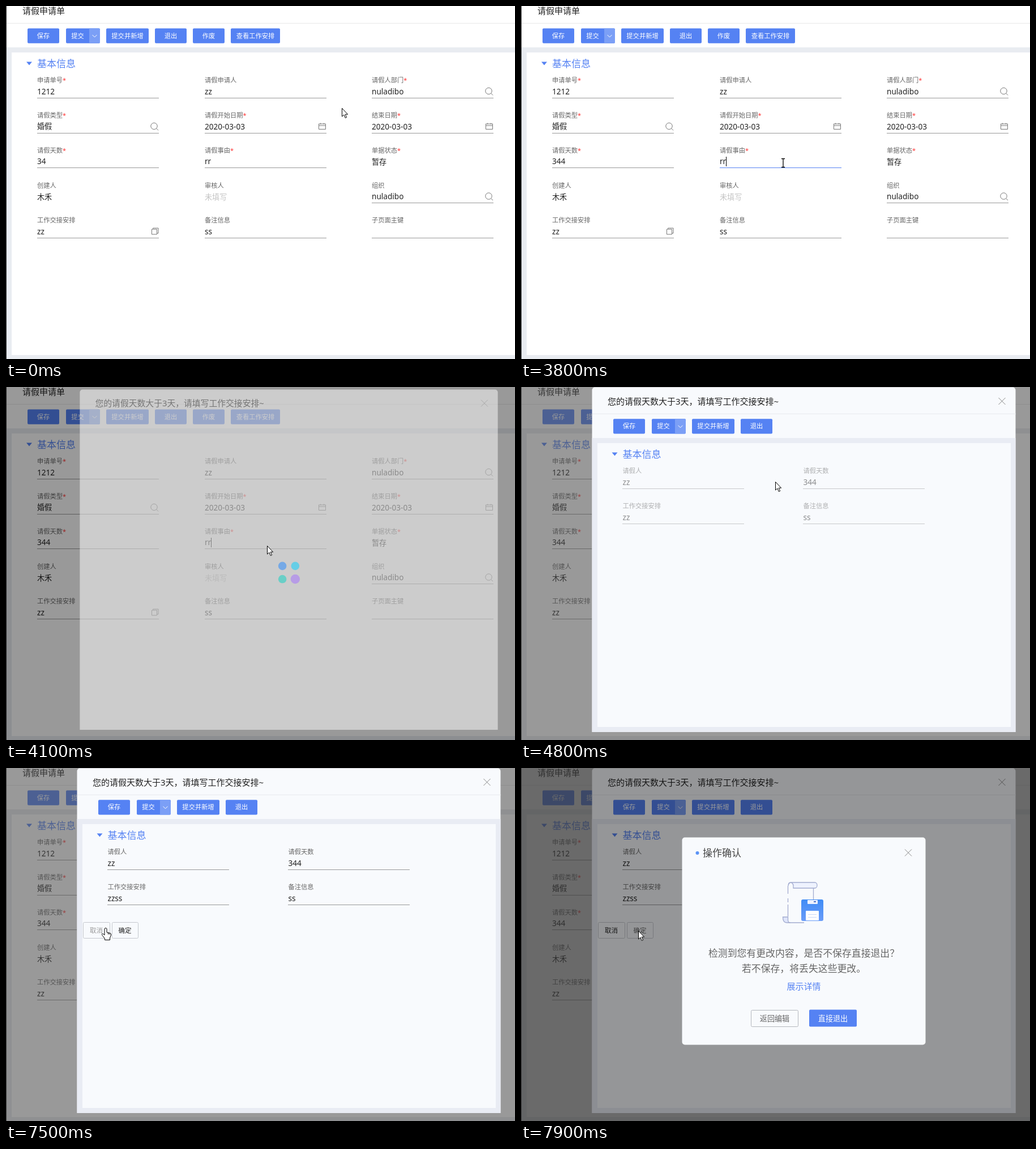
Animation of 899x623 px, one loop 8000 ms. Source, as an HTML page with a canvas:

```html
<!DOCTYPE html>
<html lang="zh-CN">
<head>
<meta charset="utf-8">
<title>请假申请单</title>
<style>
html, body { margin: 0; width: 100%; height: 100%; overflow: hidden; background: #fff; }
canvas { display: block; }
</style>
</head>
<body>
<canvas id="stage" width="899" height="623"></canvas>
<script>
const ctx = document.getElementById('stage').getContext('2d');
const W = 899, H = 623, LOOP = 8000, STEP = 100;
const FONT = '"Noto Sans", "Noto Sans CJK SC", "Noto Sans CJK", sans-serif';
const BLUE = '#5582f3', BAND = '#e9ecf1', INK = '#222', GREY = '#666';
const SHADE = 'rgba(0,0,0,.4)';

// Mouse pointer: [start time, shape, x, y]
const POINTER = [
  [0, 'arrow', 593, 180], [100, 'beam', 158, 275], [400, 'beam', 152, 274],
  [1200, 'none', 0, 0], [1500, 'beam', 154, 277], [3200, 'beam', 192, 279],
  [3300, 'arrow', 271, 329], [3400, 'arrow', 330, 338], [3500, 'arrow', 410, 310],
  [3600, 'beam', 463, 277], [4000, 'arrow', 461, 280], [4700, 'arrow', 457, 220],
  [4800, 'arrow', 449, 167], [4900, 'arrow', 430, 168], [5200, 'arrow', 360, 188],
  [5300, 'arrow', 281, 211], [5400, 'arrow', 222, 241], [5500, 'hand', 184, 285],
  [5700, 'hand', 176, 291], [6000, 'hand', 181, 287], [6100, 'arrow', 205, 260],
  [6200, 'beam', 233, 230], [7100, 'arrow', 210, 255], [7200, 'hand', 184, 276],
  [7300, 'hand', 176, 282], [7800, 'arrow', 195, 285], [7900, 'arrow', 207, 287]
];

function text(s, x, middle, size, color, align = 'left', weight = 400) {
  ctx.font = `${weight} ${size}px ${FONT}`;
  ctx.fillStyle = color;
  ctx.textAlign = align;
  ctx.fillText(s, x, middle + size * 0.37);
  return ctx.measureText(s).width;
}

function rect(x, y, w, h, color, radius = 0) {
  ctx.fillStyle = color;
  ctx.beginPath();
  ctx.roundRect(x, y, w, h, radius);
  ctx.fill();
}

function box(x, y, w, h, color, radius = 0) {
  ctx.strokeStyle = color;
  ctx.lineWidth = 1;
  ctx.beginPath();
  ctx.roundRect(x + 0.5, y + 0.5, w - 1, h - 1, radius);
  ctx.stroke();
}

function disc(x, y, r, color) {
  ctx.fillStyle = color;
  ctx.beginPath();
  ctx.arc(x, y, r, 0, 7);
  ctx.fill();
}

function path(d, x, y, stroke, fill, width = 1) {
  const shape = new Path2D(d);
  ctx.save();
  ctx.translate(x, y);
  ctx.lineWidth = width;
  if (fill) { ctx.fillStyle = fill; ctx.fill(shape); }
  if (stroke) { ctx.strokeStyle = stroke; ctx.stroke(shape); }
  ctx.restore();
}

const icons = {
  search: (x, y) => path('M6.2 0A5.7 5.7 0 1 1 -5.2 0A5.7 5.7 0 1 1 6.2 0M4.6 4.1L8 7.5', x + 206, y - 12.5, '#777'),
  date: (x, y) => path('M.5 1.5h12v9.5h-12zM.5 4.5h12M3.5 0v2M9.5 0v2', x + 201, y - 18, '#777'),
  copy: (x, y) => path('M.5 2.5h9v9h-9zM2.5 2v-1.5h9.5v9h-2', x + 202, y - 18, '#777')
};

function field(x, line, label, value, opt = {}) {
  const labelWidth = text(label, x, line - 31.5, 11.25, GREY);
  if (opt.must) text('*', x + labelWidth, line - 31.5, 11, '#f33');
  const cjk = /[\u4e00-\u9fff]/.test(value);
  const middle = line - 12 + (opt.plain ? 1.5 : 0);
  const width = text(value, x, middle, cjk ? 13.1 : 13.6, opt.color || INK);
  if (!opt.plain) rect(Math.floor(x), Math.floor(line - 0.5), 215, 1, opt.focus ? BLUE : '#999');
  if (opt.caret) rect(Math.round(x + width), line - 20, 1, 17, '#000');
  if (opt.icon) icons[opt.icon](x, line);
}

function toolbar(dx, dy, count, weight) {
  const items = [['保存', 38, 56], ['提交', 106, 60], ['提交并新增', 177, 75],
    ['退出', 263, 56], ['作废', 330, 56], ['查看工作安排', 397, 87]];
  items.slice(0, count).forEach(([name, x, w], i) => {
    const split = i === 1;
    rect(x + dx, 39.4 + dy, w, 26.25, BLUE, 2);
    if (split) {
      rect(x + dx + 41, 39.4 + dy, 19, 26.25, '#7b9ff6', [0, 2, 2, 0]);
      path('M0 0l4 4l4-4', x + dx + 46.5, 51 + dy, '#fff');
    }
    text(name, x + dx + (split ? 20.5 : w / 2), 52.5 + dy, 11.25, '#fff', 'center', weight);
  });
}

function section(dx, dy) {
  path('M0 0h10l-5 6z', 36 + dx, 98.5 + dy, null, BLUE);
  text('基本信息', 55 + dx, 102 + dy, 17, BLUE);
}

const cross = (x, y, r) => path(`M${-r} ${-r}L${r} ${r}M${r} ${-r}L${-r} ${r}`, x, y, '#888');
const within = (t, from, to) => t >= from && t < to;

function drawForm(t) {
  rect(0, 0, W, H, '#fff');
  text('请假申请单', 29, 8, 15, INK);
  rect(0, 30, W, 1, '#e8e8e8');
  toolbar(0, 0, 6, 400);
  rect(0, 73, W, 550, BAND);
  rect(10, 82, W - 10, 534, '#fff');
  section(0, 0);

  const days = within(t, 1000, 1800) || t >= 2700 ? '344' : '34';
  const daysFocus = within(t, 200, 3700);
  const daysCaret = within(t, 200, 1500) || within(t, 2000, 2500) || within(t, 2700, 3200);
  const reasonFocus = within(t, 3700, 4000);
  const [a, b, c] = [55, 351, 646];
  const must = true, plain = true;

  field(a, 162.5, '申请单号', '1212', { must });
  field(b, 162.5, '请假申请人', 'zz');
  field(c, 162.5, '请假人部门', 'nuladibo', { must, icon: 'search' });
  field(a, 224.5, '请假类型', '婚假', { must, icon: 'search' });
  field(b, 224.5, '请假开始日期', '2020-03-03', { must, icon: 'date' });
  field(c, 224.5, '结束日期', '2020-03-03', { must, icon: 'date' });
  field(a, 286, '请假天数', days, { must, focus: daysFocus, caret: daysCaret });
  field(b, 286, '请假事由', 'rr', { must, focus: reasonFocus, caret: within(t, 3700, 4200) });
  field(c, 286, '单据状态', '暂存', { must, plain });
  field(a, 348, '创建人', '木禾', { plain });
  field(b, 348, '审核人', '未填写', { plain, color: '#c4c4c4' });
  field(c, 348, '组织', 'nuladibo', { icon: 'search' });
  field(a, 409.5, '工作交接安排', 'zz', { icon: 'copy' });
  field(b, 409.5, '备注信息', 'ss');
  field(c, 409.5, '子页面主键', '');
  rect(0, 0, 1, H, '#333');
}

// Shades the page, then fades and grows a window in from its centre.
function popup(elapsed, shade, cx, cy, draw) {
  if (elapsed < 0) return;
  const shown = [0.1, 0.5, 0.9][elapsed / STEP] ?? 1;
  const scale = 0.974 + 0.026 * shown;
  rect(0, 0, W, H, shade);
  ctx.save();
  ctx.globalAlpha = shown;
  ctx.translate(cx, cy);
  ctx.scale(scale, scale);
  ctx.translate(-cx, -cy);
  draw();
  ctx.restore();
}

// The first shade turns milky once the window has loaded, and more so under the second.
function formShade(t) {
  if (t < 4600) return SHADE;
  return t < 7600 ? 'rgba(69,69,69,.55)' : 'rgba(111,111,111,.54)';
}

function spinner(t) {
  const colors = ['#1d85ff', '#00cfff', '#a16bff', '#05d1c1'];
  const active = (t / STEP + 1) % 4;
  colors.forEach((color, i) => {
    const x = i === 1 || i === 2 ? 511 : 488;
    disc(x, i < 2 ? 316 : 339.5, i === active ? 8.3 : 7.4, color);
  });
}

function drawHandover(t) {
  const loaded = t >= 4600;
  const paper = loaded ? '#f8fafd' : '#fff';
  rect(125.5, 0.5, 748, 608.5, paper, [5, 5, 0, 0]);
  text('您的请假天数大于3天，请填写工作交接安排~', 153, 25, 15, INK);
  cross(849.5, 25, 6);
  if (!loaded) return spinner(t);

  rect(126, 47, 748, 1, '#e8eaee');
  toolbar(125, 16.75, 4, 500);
  rect(125.5, 90, 748, 519, '#e9ecf4');
  rect(135, 99, 730, 501, paper);
  section(124.5, 17);

  const typed = 'zz' + (t >= 6800 ? 's' : '') + (t >= 6900 ? 's' : '');
  ctx.save();
  if (t < 4900) ctx.globalAlpha *= 0.5;
  field(179.5, 179.5, '请假人', 'zz');
  field(498.5, 179.5, '请假天数', '344');
  field(179.5, 241.5, '工作交接安排', typed, { focus: within(t, 6300, 7300), caret: within(t, 6300, 7300) });
  field(498.5, 241.5, '备注信息', 'ss');
  ctx.restore();

  if (t >= 5000) {
    const hover = within(t, 5500, 6100) || within(t, 7300, 7800);
    box(136, 272, 48, 29, '#c5c8ce', 2);
    text('取消', 159.5, 287, 11.5, hover ? '#999' : INK, 'center');
    box(187, 272, 47, 29, '#c5c8ce', 2);
    text('确定', 210, 287, 11.5, t >= 7900 ? GREY : INK, 'center');
  }
}

function drawSaveArt() {
  const line = '#a3acd0';
  path('M471.5 208v14M471.5 230v7M471.5 241v21M516.5 212v20M474 273h26', 0, 0, line, null, 1.3);
  path('M476 202h43a4 5 0 0 1 0 10h-38v-4a4 5 0 0 0-9 0q0-6 4-6z', 0, 0, line, '#eef2ff', 1.3);
  path('M462.5 263h9v5q0 5 4 5h-6q-7 0-7-10z', 0, 0, line, '#dfe5fb', 1.3);
  const blue = ctx.createLinearGradient(0, 232, 0, 270);
  blue.addColorStop(0, '#3f8cf6');
  blue.addColorStop(1, '#6a9cf8');
  rect(495, 232, 39, 38, blue, 3);
  rect(506, 233, 18, 7, '#eef3ff', 1);
  rect(517, 235, 4, 2, '#4a6fc8');
  rect(503, 252, 23, 17, '#fff', 1);
  rect(507, 258, 15, 1, '#c9d8f8');
  rect(507, 263, 15, 1, '#c9d8f8');
}

function drawConfirm() {
  rect(284.5, 122.5, 430, 366, '#f8fafd', 5);
  disc(311.5, 150, 3, '#5b93f5');
  text('操作确认', 321, 150, 17, '#444');
  cross(684, 149.5, 6);
  drawSaveArt();
  text('检测到您有更改内容，是否不保存直接退出？', 499.5, 327, 16.875, GREY, 'center');
  text('若不保存，将丢失这些更改。', 499.5, 353.5, 16.875, GREY, 'center');
  text('展示详情', 499.5, 385, 15, BLUE, 'center');
  box(406, 427, 84, 30, '#b4b7bd', 2);
  text('返回编辑', 448, 442, 13.1, GREY, 'center');
  rect(509, 426.6, 84, 30, BLUE, 2);
  text('直接退出', 551, 442, 13.1, '#fff', 'center', 500);
}

const pointers = {
  none() {},
  arrow: (x, y) => path('M.5.5v14.5l3.4-3l2.4 5.6l2.3-1l-2.4-5.4h4.4z', x, y, '#000', '#fff'),
  beam: (x, y) => path('M-3-7.5h2.4l.6.7l.6-.7h2.4M0-7v14M-3 7.5h2.4l.6-.7l.6.7h2.4', x, y, '#000', null, 1.3),
  hand: (x, y) => path('M-2 1.5Q0-1 2 1.5V8l6 1.5Q10 10 9.5 13L7.5 18v3.5H-1.5V19L-6.5 12.5Q-7 9.5-4 11L-2 13zM4.5 8.7v3M7 9.4v2.6', x, y, '#000', '#fff')
};

function render(now) {
  const t = Math.floor(now % LOOP / STEP) * STEP;
  drawForm(t);
  popup(t - 4000, formShade(t), 499.5, 305, () => drawHandover(t));
  popup(t - 7600, SHADE, 499.5, 305.5, drawConfirm);
  const [, shape, x, y] = POINTER.findLast(([start]) => start <= t);
  pointers[shape](x, y);
}

let start;
function tick(now) {
  start ??= now;
  render(now - start);
  requestAnimationFrame(tick);
}
render(0);
requestAnimationFrame(tick);
</script>
</body>
</html>
```
